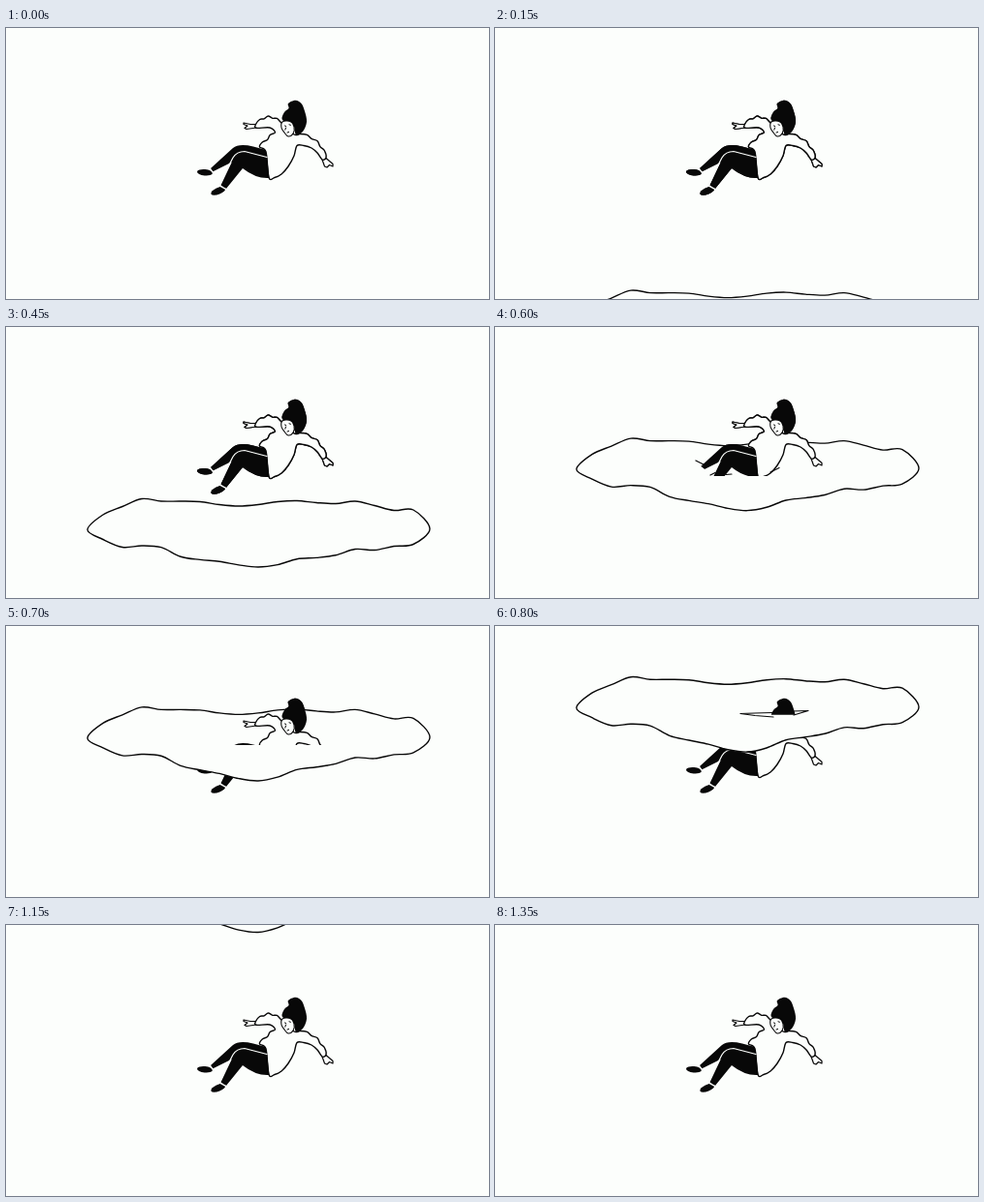
Recreate the animation shown at these times as an HTML page with a canvas. Size 498 by 280 pixels, loop 1450 ms.

```html
<!DOCTYPE html>
<html lang="en">
<head>
<meta charset="utf-8">
<title>Falling through a rising pool</title>
<style>
  html, body { margin: 0; width: 100%; height: 100%; overflow: hidden; background: #fcfefc; }
  canvas { display: block; width: 498px; height: 280px; }
</style>
</head>
<body>
<canvas id="stage" width="498" height="280"></canvas>
<script>
const ctx = document.getElementById('stage').getContext('2d');
const W = 498, H = 280, PAPER = '#fcfefc', INK = '#080808';
const LOOP = 1450;

// Even 100 ms steps, with a long first one and two short ones
const hold = step => step === 0 ? 150 : step === 4 || step === 10 ? 50 : 100;
function stepAt(t) {
  let step = 0;
  while (t >= hold(step)) t -= hold(step++);
  return step;
}

// Smooth curve through [x, y] points
function curve(points, closed = true) {
  const path = new Path2D(), n = points.length;
  const at = i => points[closed ? (i + n) % n : Math.max(0, Math.min(n - 1, i))];
  path.moveTo(...at(0));
  for (let i = 0; i < (closed ? n : n - 1); i++) {
    const [a, b, c, d] = [at(i - 1), at(i), at(i + 1), at(i + 2)];
    path.bezierCurveTo(
      b[0] + (c[0] - a[0]) / 6, b[1] + (c[1] - a[1]) / 6,
      c[0] - (d[0] - b[0]) / 6, c[1] - (d[1] - b[1]) / 6, ...c);
  }
  return path;
}

// Scalloped cloth edge, arched to the left of its direction
function frill([x0, y0], [x1, y1], bumps, arch) {
  const dx = x1 - x0, dy = y1 - y0, len = Math.hypot(dx, dy);
  return Array.from({ length: 2 * bumps + 1 }, (_, i) => {
    const t = i / (2 * bumps);
    const off = arch * Math.sin(Math.PI * t) + (i % 2) * 1.8;
    return [x0 + dx * t + dy / len * off, y0 + dy * t - dx / len * off];
  });
}

function oval(x, y, rx, ry, angle = 0) {
  const path = new Path2D();
  path.ellipse(x, y, rx, ry, angle, 0, 2 * Math.PI);
  return path;
}

function fill(path, color = INK) { ctx.fillStyle = color; ctx.fill(path); }
function line(path, width = 1.4, color = INK) {
  ctx.strokeStyle = color;
  ctx.lineWidth = width;
  ctx.stroke(path);
}
function outlined(path, width) { fill(path, PAPER); line(path, width); }

const hair = curve([[285, 95], [287, 87], [291.5, 83], [291, 78], [298.5, 74.8], [304.5, 78],
  [308, 86], [310, 97], [306, 107], [299, 110.5], [296, 100]]);
const face = curve([[285, 97], [284, 103], [287, 108], [291, 112], [296, 109], [297, 102], [293, 96.5]]);
const features = new Path2D('M287.5 101l1.2 .5M292 99.8l1.4 .5M288.6 103l-.8 2.2M290 108l1.6 -.5');
const shirt = curve([
  [297, 110],
  ...frill([303, 109.5], [330, 134], 3, 5),
  [326, 136], [321, 129], [315, 124], [307, 121.5], [300, 121.5],
  [297, 132], [291, 143], [284, 151], [277, 154.5], [271, 154.5], [268, 128],
  ...frill([261.5, 123], [277.5, 108], 2, 0),
  [272, 103], [258, 103.3],
  ...frill([257.5, 99.5], [284, 98], 3, 6)
]);
const hands = [
  new Path2D('M258 99.5l-6 0 -7 -1.5 0 1.5 4 1.5 -3 2.5 2 1 10 -1.5z'),
  new Path2D('M330 134.5l7 6 0 2.5 -3.5 -1.5 -2.5 2.5 -2.5 -1 -2.5 -7z')
];
const backLeg = new Path2D('M268 126L255 122.5Q240 119 234 124L211 145 213 148.5 234 138 269 139z');
const frontLeg = new Path2D('M269 132L252 127Q239 126 235 134L221.5 162.5 227 166 244 145Q258 156 271.5 155z');
const legGap = new Path2D('M229 143.5L234 134Q238 127.5 246 127.5L269 133.5');
const ankles = new Path2D('M210 145l3.2 4M221 163.4l5.6 3');
const shoes = [oval(205, 149.3, 8, 3.2, .1), oval(219, 168.3, 8.2, 3.4, -.4)];

function drawFigure() {
  hands.forEach(hand => outlined(hand, 1.2));
  outlined(shirt);
  [backLeg, frontLeg, ...shoes].forEach(part => fill(part));
  line(legGap, 1.2, PAPER);
  line(ankles, 1.3, PAPER);
  fill(hair);
  outlined(face, 1.1);
  line(features, 1);
}

// Pool edges, one height every 20 px around the level of its tips
const FAR = [-15.5, -24, -32, -29.5, -29.5, -29, -26, -24.5, -26, -29, -30, -28, -27, -29.5, -25, -20, -20.5];
const NEAR = [10, 18, 16.5, 18, 27, 29, 29, 31, 33, 32, 28, 28, 26, 20, 21, 17, 15];
const level = step => 240.7 - 31.2 * (step - 3);

function drawPool(step) {
  // The near edge sags in the middle as the pool rises
  const sag = 15 * Math.sqrt(Math.max(0, Math.min(1, (step - 3) / 7)));
  const y = level(step);
  const far = FAR.map((h, i) => [100 + 20 * i, y + h]);
  const near = NEAR.map((h, i) => {
    const x = 100 + 20 * i;
    return [x, y + h + sag * Math.exp(-(((x - 252) / 50) ** 2))];
  });
  outlined(curve([[84, y], ...far, [437, y - 1], ...near.reverse()]));
}

const ripples = new Path2D('M207 138l8 4M222 153l5 -2.5M238 152.5l6 -.5M284 150l9 -4.5');
const floatingArms = new Path2D('M287 89.5L268 90 253 90.5 268 92.5 287 94M307 88L323 87.5 308 92');

// The part of the figure still above the waterline
function drawAbove(step) {
  const water = level(step) + 7;
  if (step > 8) {
    const size = 11 - step;
    if (size > 0) fill(oval(288.5, water - 19, 3.5 * size, size * size * .7, -.06));
    return;
  }
  ctx.save();
  ctx.clip(new Path2D(`M0 0H${W}V${water}H225L205 ${water - 16}H0z`));
  if (step < 8) drawFigure();
  else fill(hair);
  ctx.restore();
  if (step === 6) line(ripples, 1.2);
  if (step === 8) line(floatingArms, 1.2);
}

function render(step) {
  ctx.fillStyle = PAPER;
  ctx.fillRect(0, 0, W, H);
  drawFigure();
  if (step === 0) return;
  drawPool(step);
  drawAbove(step);
}

ctx.lineJoin = ctx.lineCap = 'round';
const start = performance.now();
function tick(now) {
  render(stepAt(Math.max(0, now - start) % LOOP));
  requestAnimationFrame(tick);
}
render(0);
requestAnimationFrame(tick);
</script>
</body>
</html>
```
